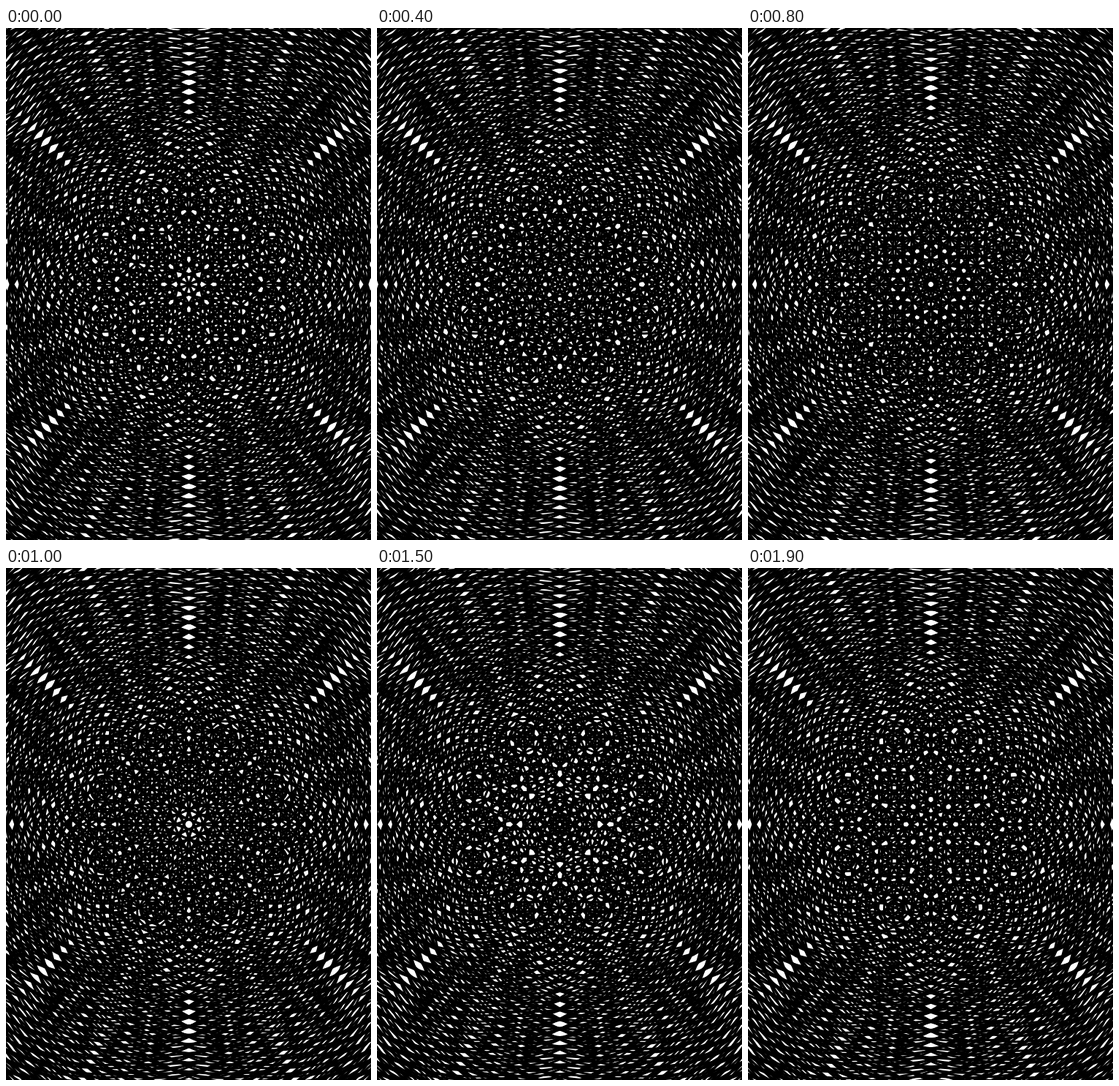
Recreate the animation shown at these times as an HTML page with a canvas. Size 500 px wide and 700 px high, loop 2 s.

```html
<!DOCTYPE html>
<html>
<head>
<meta charset="utf-8">
<title>Ring interference</title>
<style>
  html, body { margin: 0; width: 100%; height: 100%; overflow: hidden; background: #fff; }
  canvas { display: block; }
</style>
</head>
<body>
<canvas id="stage" width="500" height="700"></canvas>
<script>
const ctx = document.getElementById('stage').getContext('2d');
const WIDTH = 500, HEIGHT = 700;
// The pattern is centred on the middle of a pixel.
const CENTER_X = WIDTH / 2 + 0.5, CENTER_Y = HEIGHT / 2 + 0.5;
const LOOP = 2000, STEPS = 20;
const SOURCES = 8, ORBIT = 125;
const SPACING = 12.5, LINE = 3;
const REACH = Math.hypot(CENTER_X, CENTER_Y) + ORBIT + SPACING;

// Concentric rings grow by one spacing per loop around every source.
function draw(progress) {
  ctx.fillStyle = '#fff';
  ctx.fillRect(0, 0, WIDTH, HEIGHT);
  ctx.strokeStyle = '#000';
  ctx.lineWidth = LINE;
  for (let i = 0; i < SOURCES; i++) {
    const angle = (i + 0.5) * 2 * Math.PI / SOURCES;
    const x = CENTER_X + ORBIT * Math.cos(angle);
    const y = CENTER_Y + ORBIT * Math.sin(angle);
    for (let radius = progress * SPACING; radius < REACH; radius += SPACING) {
      if (radius === 0) continue;
      ctx.beginPath();
      ctx.arc(x, y, radius, 0, 2 * Math.PI);
      ctx.stroke();
    }
  }
}

const start = performance.now();
let shown = -1;

function tick() {
  const elapsed = (performance.now() - start) % LOOP;
  const step = Math.floor(elapsed / LOOP * STEPS);
  if (step !== shown) {
    shown = step;
    draw(step / STEPS);
  }
  requestAnimationFrame(tick);
}
tick();
</script>
</body>
</html>
```
